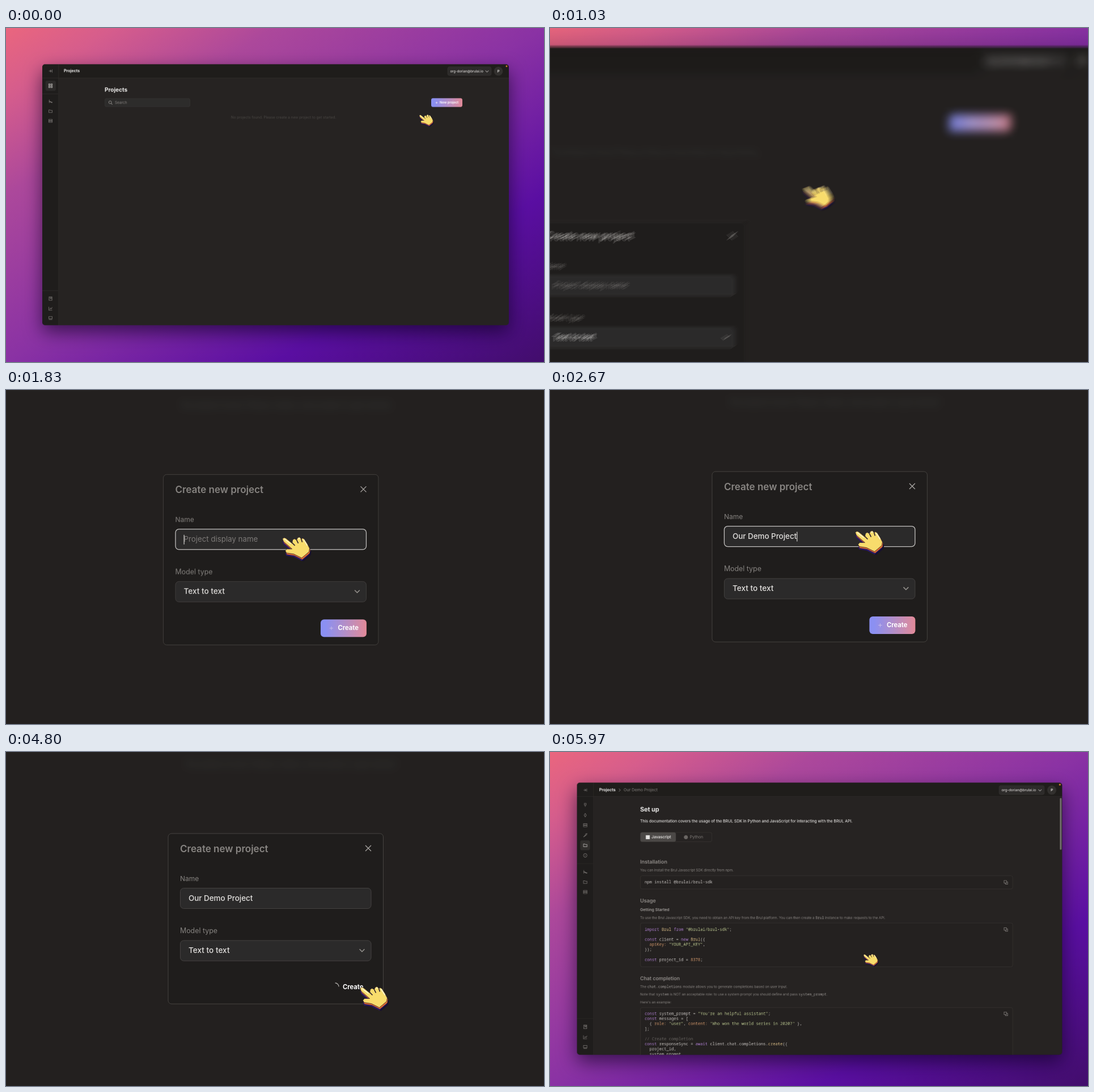
Recreate the animation shown at these times as an HTML page with a canvas. Size 949 by 590 pixels, loop 6010 ms.

```html
<!DOCTYPE html>
<html lang="en">
<head>
<meta charset="utf-8">
<title>Create a project</title>
<style>
html, body { margin: 0; width: 100%; height: 100%; overflow: hidden; background: #8a32a4; }
canvas { display: block; }
</style>
</head>
<body>
<canvas id="stage" width="949" height="590"></canvas>
<script>
const W = 949, H = 590, CX = 475.5, CY = 294.5, LOOP = 6010;
const OPEN = 760, FOCUS = 1400, TYPE = 1930, SUBMIT = 3690, LOADED = 5100;
const SANS = 'Inter, sans-serif', MONO = '"Noto Sans Mono", monospace';
const PROJECT = 'Our Demo Project', ACCOUNT = 'org-dorian@brulai.io';
const clamp = (v, a = 0, b = 1) => Math.min(b, Math.max(a, v));
const smooth = p => p * p * (3 - 2 * p);

let g; // context being drawn on

function makeCanvas(w, h) {
  const c = document.createElement('canvas');
  c.width = w;
  c.height = h;
  return c.getContext('2d');
}

// ---- drawing helpers ----
function text(s, x, y, size, color, weight = 400, family = SANS) {
  g.font = `${weight} ${size}px ${family}`;
  g.textBaseline = 'middle';
  g.fillStyle = color;
  g.fillText(s, x, y);
  return g.measureText(s).width;
}

function box(x, y, w, h, r, fill, border, line = 1) {
  g.beginPath();
  g.roundRect(x, y, w, h, r);
  if (fill) { g.fillStyle = fill; g.fill(); }
  if (border) { g.strokeStyle = border; g.lineWidth = line; g.stroke(); }
}

function rect(x, y, w, h, color) {
  g.fillStyle = color;
  g.fillRect(x, y, w, h);
}

function dot(x, y, r, color) {
  g.beginPath();
  g.arc(x, y, r, 0, 7);
  g.fillStyle = color;
  g.fill();
}

const icons = {
  collapse: 'M-4 0H2M-1 -3L2 0L-1 3M4 -4V4',
  grid: 'M-4 -4h3v3h-3zM1 -4h3v3h-3zM-4 1h3v3h-3zM1 1h3v3h-3z',
  branch: 'M-3 -4V4M-3 0Q0 0 2 2h2v1h-2z',
  folder: 'M-4 -3h3l1 1h4v5h-8z',
  server: 'M-4 -3.5h8v3h-8zM-4 .5h8v3h-8z',
  book: 'M-3.5 -4h7v8h-7zM-1 -4v4l1.5 -1l1.5 1v-4',
  chart: 'M-4 -4V4H4M-2 2L0 -1L2 1L4 -3',
  chat: 'M-4 -3h8v5h-8zM-4 4h8',
  copy: 'M-4 -4h5.5v5.5h-5.5zM-1 2v2h5v-5h-2',
  pin: 'M-2 -4h4v4h-4zM0 0v4',
  gem: 'M0 -4L2.5 0L0 4L-2.5 0z',
  rocket: 'M-4 4L0 0L1 -3L4 -4L3 -1z',
  ring: 'M-4 0a4 4 0 1 0 8 0a4 4 0 1 0 -8 0M-1 0h2',
  search: 'M-4 -1a3 3 0 1 0 6 0a3 3 0 1 0 -6 0M1 1.3L4 4',
  down: 'M-4 -2L0 2L4 -2',
  right: 'M-2 -4L2 0L-2 4',
  cross: 'M-4 -4L4 4M4 -4L-4 4',
  plus: 'M-4 0H4M0 -4V4'
};

function icon(name, x, y, scale, color, line = 1) {
  g.save();
  g.translate(x, y);
  g.scale(scale, scale);
  g.strokeStyle = color;
  g.lineWidth = line;
  g.stroke(new Path2D(icons[name]));
  g.restore();
}

function gradientButton(x, y, w, h, r) {
  const fill = g.createLinearGradient(x, 0, x + w, 0);
  fill.addColorStop(0.1, '#8b90f2');
  fill.addColorStop(0.55, '#b58ec6');
  fill.addColorStop(1, '#e28a98');
  box(x, y, w, h, r, fill);
}

// Static picture at twice the base size, drawn in coordinates seen at the given zoom
function layer(zoom, draw) {
  g = makeCanvas(W * 2, H * 2);
  g.translate(W, H);
  g.scale(2 / zoom, 2 / zoom);
  g.translate(-CX, -CY);
  draw();
  return g.canvas;
}

function shell(x, y, w, h) {
  g.save();
  g.shadowColor = 'rgba(12,0,30,.62)';
  g.shadowBlur = 64;
  g.shadowOffsetY = 24;
  box(x, y, w, h, 5, '#262322');
  g.restore();
  g.beginPath();
  g.roundRect(x, y, w, h, 5);
  g.clip();
  rect(x, y, w, 24, '#1f1d1b');
  rect(x, y, 28.5, h, '#1f1d1c');
  rect(x, y + 24, w, 0.8, '#302d2b');
  rect(x + 28.5, y, 0.8, h, '#302d2b');
}

function account(x, y, k) {
  box(x, y, 77 * k, 15.5 * k, 3.5, '#2d2b2a', '#383533', 0.6);
  text(ACCOUNT, x + 4.5, y + 8 * k, 5.9 * k, '#d9d6d4', 500);
  icon('down', x + 69.5 * k, y + 8 * k, 0.7, '#c8c5c3');
  dot(x + 89.5 * k, y + 7.8 * k, 7.8 * k, '#32302e');
  text('P', x + 87.6 * k, y + 8 * k, 6.2 * k, '#e5e2e0', 600);
}

function projectsScreen() {
  shell(64, 64, 823, 461);
  icon('collapse', 78.5, 76, 0.7, '#8d8986');
  text('Projects', 102, 76, 7, '#ecebea', 700);
  account(779, 68.5, 1);
  dot(883, 67.5, 1.4, '#e0862f');
  box(69.5, 93, 18.5, 18, 3, '#2c2a29');
  icon('grid', 78.5, 102, 0.8, '#c4c1be');
  [['branch', 129.5], ['folder', 147], ['server', 164], ['book', 478], ['chart', 495.5], ['chat', 512]]
    .forEach(([name, y]) => icon(name, 78.5, y, 0.75, '#7f7b78'));
  rect(64, 116, 28, 0.8, '#302d2b');
  rect(64, 463.5, 28, 0.8, '#302d2b');
  text('Projects', 174, 109.5, 10, '#f1f0ef', 700);
  box(174.5, 124.5, 150, 14.5, 3, '#2d2c2b', '#3a3836', 0.6);
  icon('search', 184.5, 132, 0.8, '#a09c99');
  text('Search', 192, 132, 6.5, '#85817e');
  gradientButton(750, 124, 55, 15.5, 3);
  icon('plus', 759.5, 132, 0.45, '#f3f0f5', 1.4);
  text('New project', 765, 132, 5.7, '#ffffff', 600);
  g.textAlign = 'center';
  text('No projects found. Please create a new project to get started.', 489.5, 158, 6.4, '#494643');
  g.textAlign = 'left';
}

const syntax = /(\/\/.*)|("[^"]*")|\b(import|from|const|new|await)\b|(\b\d+\b|\w+:)|(Brul|create)|([^\s\w"]+|\w+|\s+)/g;
const inks = ['#6f6b68', '#c2cf96', '#b483d6', '#dda072', '#e6c88f', '#cbc7c4'];

function code(x, y, lines) {
  lines.forEach((line, row) => {
    let left = x;
    for (const m of line.matchAll(syntax)) {
      const kind = m.slice(1).findIndex(v => v !== undefined);
      left += text(m[0], left, y + row * 8.9, 7.1, inks[kind], 400, MONO);
    }
  });
}

function codeBox(y, h, first, lines) {
  box(160.5, y, 654.5, h, 3, '#242120', '#383532', 0.8);
  icon('copy', 803, first, 0.8, '#85817e');
  code(168, first, lines);
}

// Backticks switch to the code font
function prose(s, y) {
  let x = 160;
  s.split('`').forEach((part, i) => {
    x += text(part, x, y, i % 2 ? 6.3 : 6.05, i % 2 ? '#a29e9b' : '#8b8784', 400, i % 2 ? MONO : SANS);
  });
}

function setupScreen() {
  shell(49, 55, 853, 479);
  icon('collapse', 63.5, 68, 0.7, '#7f7b78');
  text('Projects', 88, 68, 7.2, '#ecebea', 700);
  icon('right', 124, 68, 0.65, '#85817e');
  text(PROJECT, 131, 68, 7.1, '#8b8784');
  account(791, 60, 1.036);
  dot(898, 58.5, 1.5, '#e0862f');
  box(54.5, 156.5, 17.5, 17.5, 3, '#302e2c');
  ['pin', 'gem', 'server', 'rocket', 'folder', 'ring'].forEach((name, i) =>
    icon(name, 63.5, 94.5 + i * 17.7, 0.78, i == 4 ? '#c4c1be' : '#7f7b78'));
  [['branch', 212], ['folder', 230], ['server', 247.5], ['book', 485], ['chart', 503], ['chat', 520]]
    .forEach(([name, y]) => icon(name, 63.5, y, 0.78, '#7f7b78'));
  rect(49, 197, 28, 0.8, '#302d2b');
  rect(49, 470, 28, 0.8, '#302d2b');
  box(898, 82, 3, 91, 1.5, '#73706d');

  text('Set up', 160, 102.5, 10.8, '#f1f0ef', 700);
  text('This documentation covers the usage of the BRUL SDK in Python and JavaScript for interacting with the BRUL API.',
    160, 123, 6.85, '#e4e2e0', 500);
  box(160.5, 142.5, 125.5, 16.5, 3, null, '#393633', 0.8);
  box(160.5, 142.5, 62.5, 16.5, 3, '#4b4846');
  rect(170, 147.5, 7, 7, '#e6e4e2');
  text('Javascript', 180, 151, 6.8, '#e6e4e2', 600);
  dot(240.5, 151, 3.6, '#6a6663');
  text('Python', 247.5, 151, 7, '#85817e');

  text('Installation', 160, 195, 9, '#94908d', 600);
  prose('You can install the Brul Javascript SDK directly from npm.', 209.5);
  codeBox(219, 23, 230.5, ['npm install @brulai/brul-sdk']);
  text('Usage', 160, 263.5, 9, '#94908d', 600);
  text('Getting Started', 160, 279, 7, '#a29e9b', 600);
  prose('To use the Brul Javascript SDK, you need to obtain an API key from the Brul platform. ' +
    'You can then create a `Brul` instance to make requests to the API.', 293);
  codeBox(302, 77, 313.5, [
    'import Brul from "@brulai/brul-sdk";', '',
    'const client = new Brul({', '  apiKey: "YOUR_API_KEY",', '});', '',
    'const project_id = 8378;'
  ]);
  text('Chat completion', 160, 400, 8.8, '#94908d', 600);
  prose('The `chat.completions` module allows you to generate completions based on user input.', 414.5);
  prose('Note that `system` is NOT an acceptable role: to use a system prompt you should define and pass `system_prompt`.', 428);
  prose("Here's an example:", 442);
  codeBox(451, 120, 462, [
    'const system_prompt = "You\'re an helpful assistant";',
    'const messages = [',
    '  { role: "user", content: "Who won the world series in 2020?" },',
    '];', '',
    '// Create completion',
    'const responseSync = await client.chat.completions.create({',
    '  project_id,', '  system_prompt,'
  ]);
}

function modal(t) {
  const focused = t >= FOCUS && t < SUBMIT;
  const typed = PROJECT.slice(0, clamp(Math.floor((t - TYPE) / 40), 0, PROJECT.length));
  box(285.5, 144.5, 379.5, 301, 6, '#1f1d1c', '#464340');
  text('Create new project', 306.5, 172, 17, t < FOCUS ? '#b4b1ae' : '#888582', 600);
  icon('cross', 638.5, 170.5, 1.25, '#aaa7a4');
  text('Name', 306.5, 225, 12, '#85827f');
  box(307, 241, 336.5, 36, 6, '#2b2a2a', focused ? '#c2c0be' : '#444140', focused ? 1.3 : 1);
  const end = 321.5 + (typed ? text(typed, 321.5, 259.5, 13.4, '#e3e1df', 500) : 0);
  if (!typed) text('Project display name', 321.5, 259.5, 13.3, '#7f7c7a');
  if (focused) rect(end, 251, 1.2, 17, '#d5d3d1');
  text('Model type', 306.5, 317, 12.4, '#85827f');
  box(307, 333.5, 336.5, 36, 6, '#2b2a2a', '#444140');
  text('Text to text', 321.5, 351.5, 13.6, '#e3e1df', 500);
  icon('down', 627.5, 351, 1.1, '#96938f', 1.4);
  if (t < SUBMIT) {
    gradientButton(563, 400.5, 81, 31, 6);
    icon('plus', 582, 416, 0.8, '#d3c6ea');
  } else {
    const turn = -1.75 + (t - 3770) / 1000 * Math.PI * 2;
    g.beginPath();
    g.arc(580, 415, 6.5, turn, turn + 1.55);
    g.strokeStyle = '#a9a6a3';
    g.lineWidth = 1.3;
    g.stroke();
  }
  text('Create', 593.5, 416, 11.2, '#ffffff', 700);
}

// ---- pointer ----
const hand = new Path2D('M0 3L3 1L6 2L17 11L18 5L21 3L25 5L27 1L30 0L33 3L36 2L39 4L44 12L48 20' +
  'L47 26L40 32L34 37L20 30L7 28L5 24L8 21L17 21L2 8Z');

function pointer() {
  for (const [dx, dy, color] of [[3, 6, '#17112f'], [0, 5, '#2b1a63'], [1, 2.5, '#e8702c'], [0, 0, '#f8dc6c']]) {
    g.save();
    g.translate(dx, dy);
    g.fillStyle = color;
    g.fill(hand);
    if (!dy) {
      g.lineWidth = 0.8;
      g.strokeStyle = '#2a1c2c';
      g.stroke(hand);
      g.lineWidth = 1.6;
      g.stroke(new Path2D('M17 10L22 15M25 5L28 11M33 3L35 9'));
      g.strokeStyle = '#fff6d0';
      g.stroke(new Path2D('M3 3L15 12M28 3L31 2M37 4L44 15'));
    }
    g.restore();
  }
}

// time, x, y from the window centre, bow of the path
const path = [
  [0, 253.5, -141.5, 0], [430, 304, -160, 0], [800, 304, -160, 0], [1230, 10.3, -20, -22],
  [1880, 10.3, -20, 0], [2500, 31.5, -23, 0], [3200, 31.5, -23, 0], [3620, 74.5, 60, 0], [LOOP, 74.5, 60, 0]
];

function pointerAt(t) {
  const i = Math.max(1, path.findIndex(k => k[0] > t));
  const [t0, x0, y0] = path[i - 1], [t1, x1, y1, bow] = path[i];
  const p = smooth(clamp((t - t0) / (t1 - t0)));
  return [x0 + (x1 - x0) * p, y0 + (y1 - y0) * p + bow * Math.sin(Math.PI * p)];
}

// ---- camera ----
function spring(t, start) {
  const d = Math.max(0, t - start) * 0.006;
  return 1 - (1 + d) * Math.exp(-d);
}

function camera(t) {
  const zoomIn = spring(t, 0), pan = zoomIn - spring(t, 835);
  return { s: 1 + zoomIn - spring(t, 5130), x: CX - 474 * pan, y: CY + 294 * pan };
}

// ---- static layers ----
const projects = layer(1, projectsScreen);
const setup = layer(1.0365, setupScreen);
const dimmed = layer(1, () => {
  g.beginPath();
  g.roundRect(64, 64, 823, 461, 5);
  g.clip();
  rect(0, 0, W, H, '#242120');
  g.setTransform(1, 0, 0, 1, 0, 0);
  g.filter = 'blur(8px)';
  g.drawImage(projects, 0, 0);
  g.filter = 'none';
  rect(0, 0, W * 2, H * 2, 'rgba(20,20,18,.14)');
});

g = makeCanvas(W, H);
const sky = g.createLinearGradient(0, 0, 529, 851);
['#ea667e', '#d65d8c', '#ac489b', '#8a32a4', '#5a0ea2', '#420d6c']
  .forEach((color, i) => sky.addColorStop([0, 0.1, 0.25, 0.5, 0.75, 1][i], color));
rect(0, 0, W, H, sky);
const wallpaper = g.canvas;

const stage = document.getElementById('stage').getContext('2d');
const buffer = makeCanvas(W, H);
buffer.imageSmoothingQuality = 'high';

function paint(t, shutter) {
  const { s, x, y } = camera(shutter);
  const [px, py] = pointerAt(shutter);
  const place = picture => g.drawImage(picture, x - W / 2 * s, y - H / 2 * s, W * s, H * s);
  g = buffer;
  g.drawImage(wallpaper, 0, 0);
  place(t < LOADED ? projects : setup);
  if (t >= OPEN && t < LOADED) {
    g.globalAlpha = clamp((t - OPEN) / 120);
    place(dimmed);
    g.save();
    g.translate(x, y);
    g.scale(s / 2, s / 2);
    g.translate(-475, -295);
    modal(t);
    g.restore();
    g.globalAlpha = 1;
  }
  g.save();
  g.translate(x + px * s, y + py * s);
  g.scale(s / 2, s / 2);
  pointer();
  g.restore();
}

const SAMPLES = 6, STEP = 2; // motion blur
const begin = performance.now();

function frame() {
  const t = Math.max(0, performance.now() - begin) % LOOP;
  for (let i = 0; i < SAMPLES; i++) {
    paint(t, Math.max(0, t - i * STEP));
    stage.globalAlpha = 1 / (i + 1);
    stage.drawImage(buffer.canvas, 0, 0);
  }
  requestAnimationFrame(frame);
}
frame();
</script>
</body>
</html>
```
